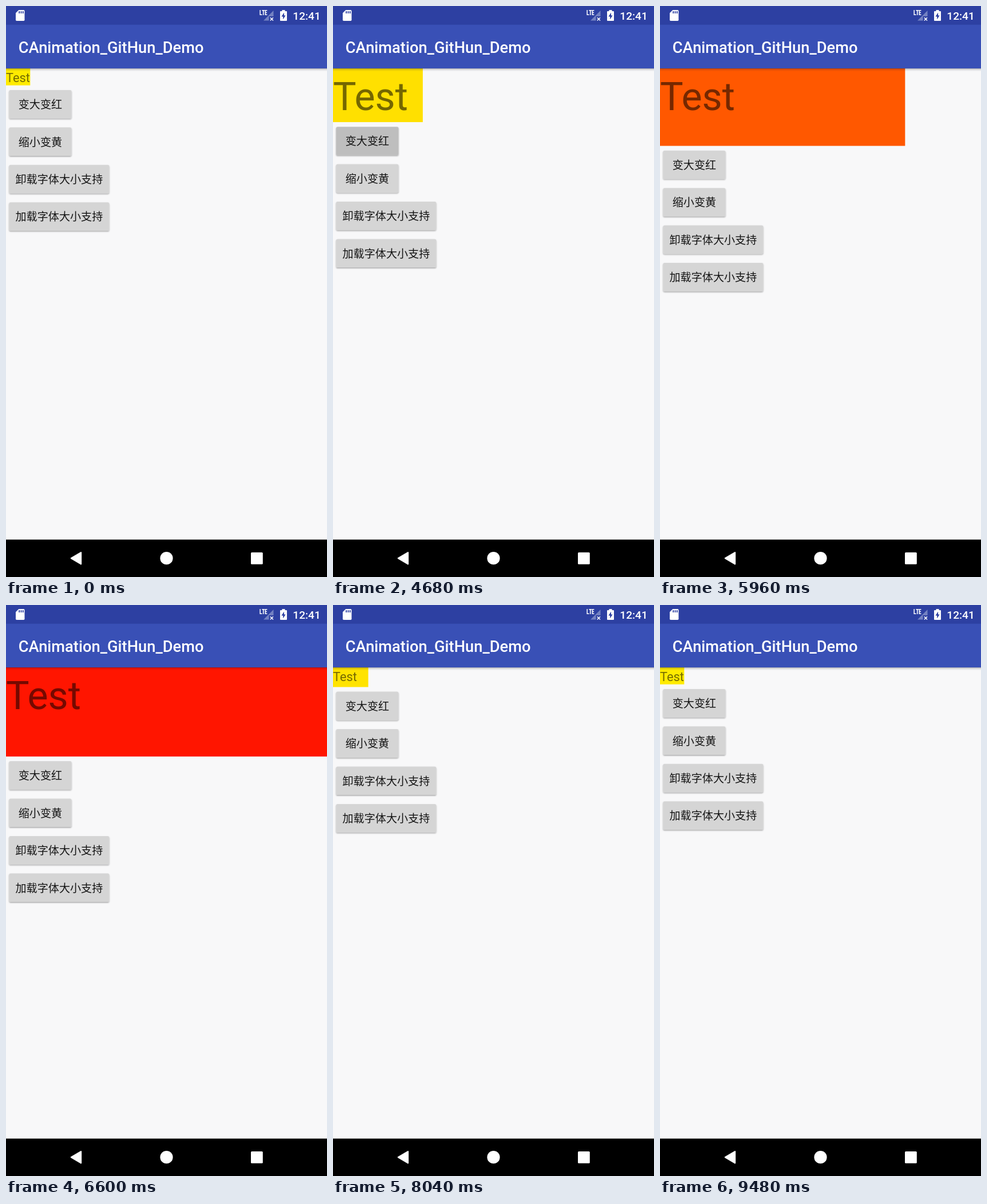
Animation, 561 px wide and 998 px high, one loop 9.52 s. Source, as an HTML page:

```html
<!DOCTYPE html>
<html lang="zh-CN">
<head>
<meta charset="utf-8">
<style>
html, body { margin: 0; width: 100%; height: 100%; overflow: hidden; background: #f8f8f9; }
svg { display: block; width: 100vw; height: 100vh; }
text { font-family: Roboto, sans-serif; }
.cjk { font: 19.1px "Noto Sans CJK SC", "Noto Sans CJK", "Noto Sans CJK JP", sans-serif; fill: #141414; text-anchor: middle; }
.bar { font-weight: 500; fill: #fff; }
</style>
</head>
<body>
<svg id="stage" viewBox="0 0 561 998" preserveAspectRatio="none">
  <defs>
    <filter id="lift" x="-10%" y="-20%" width="120%" height="150%">
      <feDropShadow dx="0" dy="1.3" stdDeviation="1.1" flood-color="#000" flood-opacity=".36"/>
    </filter>
    <linearGradient id="shade" x2="0" y2="1">
      <stop offset="0" stop-color="#000" stop-opacity=".3"/>
      <stop offset=".4" stop-color="#000" stop-opacity=".1"/>
      <stop offset="1" stop-color="#000" stop-opacity="0"/>
    </linearGradient>
  </defs>

  <rect width="561" height="998" fill="#f8f8f9"/>
  <rect id="box" y="109"/>
  <text id="label" fill="#000" fill-opacity=".54">Test</text>
  <g id="buttons"></g>

  <rect y="109" width="561" height="5.5" fill="url(#shade)"/>
  <rect width="561" height="109.1" fill="#3950b6"/>
  <rect width="561" height="32.7" fill="#2d40a2"/>
  <text class="bar" x="21.8" y="81.5" font-size="27.3">CAnimation_GitHun_Demo</text>

  <path d="M22.3 7H30.8Q32.5 7 32.5 8.7V24.3Q32.5 26 30.8 26H18.7Q17 26 17 24.3V12.3Z" fill="#fff"/>
  <path d="M23.2 9V13M26.5 9V13M29.8 9V13" stroke="#2d40a2" stroke-width="1.8"/>
  <path d="M444.2 7V15.3H447.6M447.3 7.7H452.2M449.8 7.7V16M456.4 7.7H453.3V15.3H456.4M453.3 11.4H456" fill="none" stroke="#fff" stroke-width="1.5"/>
  <path d="M467.5 8V18H459.5V25.5H450Z" fill="#7482c2"/>
  <path d="M461.8 20.3L467 25.5M467 20.3L461.8 25.5" stroke="#fff" stroke-width="1.6"/>
  <path d="M482.5 9V7H487.5V9H490Q491 9 491 10V25Q491 26 490 26H480Q479 26 479 25V10Q479 9 480 9Z" fill="#fff"/>
  <path d="M486 11.5L481.4 18.4H484.2V23.5L488.6 16.4H486Z" fill="#2d40a2"/>
  <text class="bar" x="501.3" y="23.6" font-size="19.1">12:41</text>

  <rect y="932.6" width="561" height="65.4"/>
  <path d="M114 965.2L131 955.2V975.2Z" fill="#fff" stroke="#fff" stroke-width="2.4" stroke-linejoin="round"/>
  <circle cx="280.5" cy="965.2" r="11.1" fill="#fff"/>
  <rect x="428" y="955" width="20.8" height="20.8" rx="1.6" fill="#fff"/>
</svg>
<script>
const LOOP = 9520, FRAME = 40;
const SMALL = { w: 42.3, h: 29.7 }, LARGE = { w: 134.3, h: 90.5 }, FULL = { w: 561, h: 155.8 };
const YELLOW = 235, RED = 21;
const GROW = 4575, SHRINK = 7388, SHRINK_TIME = 2000;
const GROWTH = [[GROW, 0], [4680, .053], [5320, .344], [5400, .405], [6360, .892], [6575, 1]];
const BUTTONS = [
  { name: '变大变红', w: 109.1, press: 4480 },
  { name: '缩小变黄', w: 109.1, press: 7280 },
  { name: '卸载字体大小支持', w: 175, press: 2840 },
  { name: '加载字体大小支持', w: 175 }
];

const $ = id => document.getElementById(id);
const clamp = x => Math.max(0, Math.min(1, x));
const mix = (a, b, p) => a + (b - a) * p;
const set = (el, attrs) => { for (const k in attrs) el.setAttribute(k, attrs[k]); };

$('buttons').innerHTML = BUTTONS.map(({ name, w }, i) => {
  const y = i * 65.45 + 8.2, shape = `x="5.4" y="${y}" width="${w}" height="49.6" rx="2.6"`;
  return `<clipPath id="clip${i}"><rect ${shape}/></clipPath>
    <rect ${shape} fill="#d5d5d5" filter="url(#lift)"/>
    <g clip-path="url(#clip${i})"><circle id="ripple${i}" cx="${5.4 + w / 2}" cy="${y + 24.8}" r="0"/></g>
    <text class="cjk" x="${5.4 + w / 2}" y="${y + 32.2}">${name}</text>`;
}).join('');

function track(keys, t) {
  const i = keys.findIndex(k => t < k[0]);
  if (i < 0) return keys[keys.length - 1][1];
  if (i === 0) return keys[0][1];
  const [t0, a] = keys[i - 1], [t1, b] = keys[i];
  return mix(a, b, (t - t0) / (t1 - t0));
}

function bounce(p) {
  const t = p * 1.1226, arc = x => 8 * x * x;
  if (t < .3535) return arc(t);
  if (t < .7408) return arc(t - .54719) + .7;
  if (t < .9644) return arc(t - .8526) + .9;
  return Math.min(1, arc(t - 1.0435) + .95);
}

function draw(t) {
  const big = t >= GROW && t < SHRINK;
  let p = 0;
  if (big) p = track(GROWTH, t);
  else if (t >= SHRINK) p = 1 - bounce(clamp((t - SHRINK) / SHRINK_TIME));

  const from = big ? LARGE : SMALL;
  const h = mix(from.h, FULL.h, p);
  set($('box'), {
    width: mix(from.w, FULL.w, p),
    height: h,
    fill: `rgb(255,${Math.round(mix(YELLOW, RED, p))},0)`
  });
  set($('label'), { 'font-size': big ? 68.2 : 21.8, y: big ? 182 : 132.7 });
  set($('buttons'), { transform: `translate(0 ${109 + h})` });

  BUTTONS.forEach(({ w, press }, i) => {
    const age = press ? t - press : -1;
    const on = age >= 0 ? 1 - clamp((age - 250) / 350) : 0;
    set($('ripple' + i), { r: clamp(age / 180) * (w / 2 + 8), 'fill-opacity': .11 * on });
  });
}

let start;
function tick(now) {
  if (start === undefined) start = now;
  const t = (now - start) % LOOP;
  draw(Math.floor(t / FRAME) * FRAME);
  requestAnimationFrame(tick);
}
draw(0);
requestAnimationFrame(tick);
</script>
</body>
</html>
```
